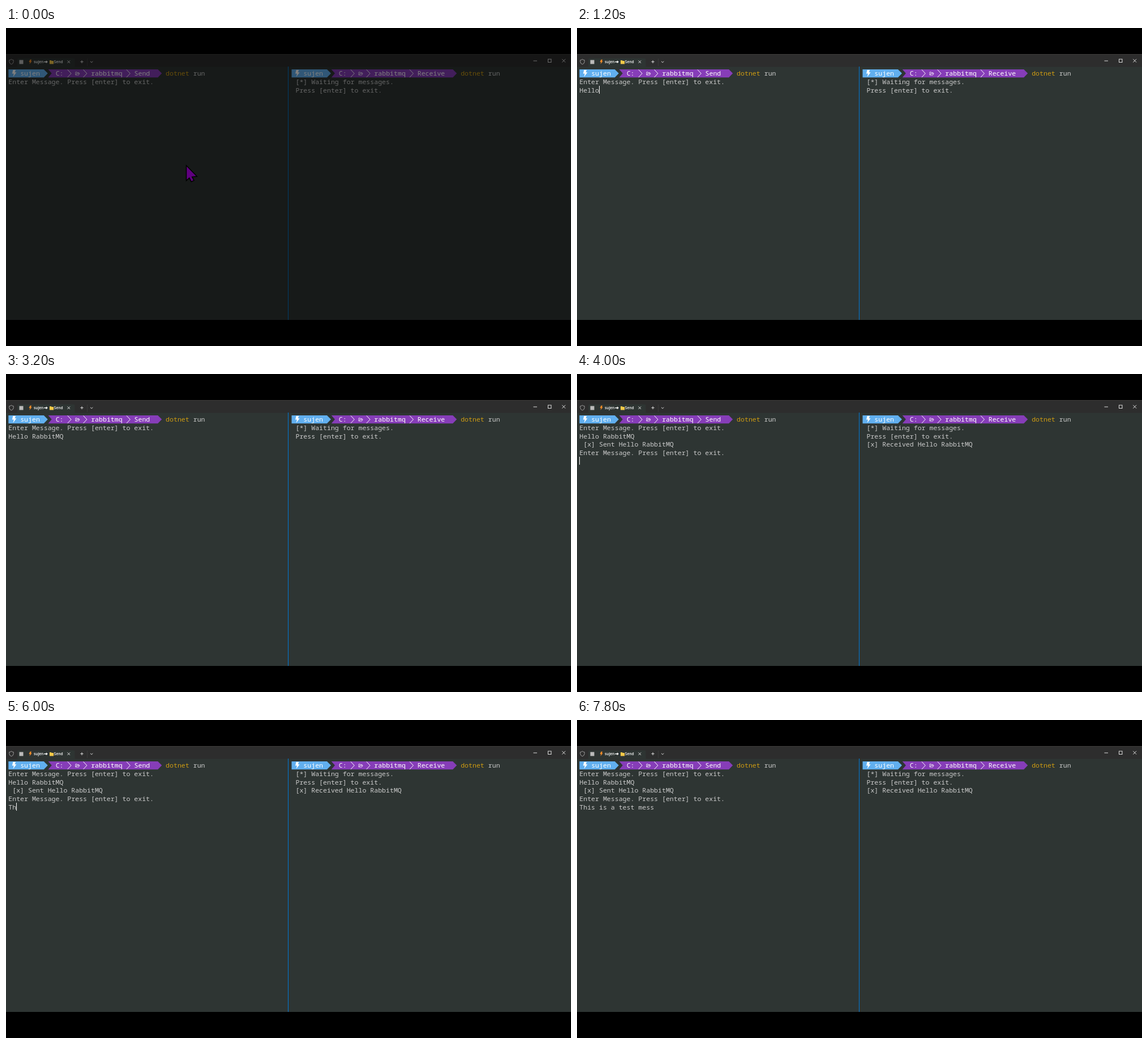
Write an HTML page that moves like this. It is 998x561 px and loops after 8 s.

```html
<!DOCTYPE html>
<html>
<head>
<meta charset="utf-8">
<style>
  html, body { margin: 0; width: 100%; height: 100%; overflow: hidden; background: #000; }
  svg { display: block; }
  text { white-space: pre; fill: #ccc; font: 11.575px "Noto Sans Mono", monospace; font-variant-ligatures: none; }
  .prompt { fill: #fff; font-weight: 500; }
  .cmd { fill: #cf9c12; }
  .tab { fill: #fff; font: 600 6.6px "Open Sans", sans-serif; }
  .line { fill: none; stroke: #ddd; stroke-width: 1; }
</style>
</head>
<body>
<svg id="stage" width="998" height="561" viewBox="0 0 998 561"></svg>
<script>
const CELL = 6.945, ROW = 14.65, USER = 'sujen';
const stage = document.getElementById('stage');
const rowY = row => 84.3 + ROW * row;
const path = (d, attrs) => `<path d="${d}" ${attrs}/>`;
const text = (x, y, str, cls = '') => `<text x="${x}" y="${y}" class="${cls}">${str}</text>`;

// One powerline prompt followed by its command
function prompt(x0, folder) {
  const col = k => x0 + CELL * k;
  const end = 33 + folder.length;
  const chevron = k => path(`M${col(k) + .3} 73.5l6.3 6.7l-6.3 6.7`, 'class="line" style="stroke:#fff"');
  return path(`M${x0} 73H${col(9)}l7 7.1l-7 7.1H${x0}z`, 'fill="#61afef"') +
    path(`M${col(10) + .8} 73H${col(end + 1)}l7 7.1l-7 7.1H${col(10) + .8}l6.2-7.1z`, 'fill="#863db8"') +
    path(`M${col(1) + 1.2} 74h4.6l-1.6 4.2h3l-6 8l1.4-5.6h-3z`, 'fill="#fff"') +
    path(`M${col(17) + .6} 83v-5.2h2.2l.8 1h2.8v1.4M${col(17) + .6} 83l1.8-2.8h5.2l-1.7 2.8z`,
      'class="line" style="stroke:#fff;stroke-width:.8"') +
    [15, 19, 30].map(chevron).join('') +
    [[3, USER], [12, 'C:'], [21, 'rabbitmq'], [32, folder]]
      .map(([k, s]) => text(col(k), rowY(0), s, 'prompt')).join('') +
    text(col(end + 3), rowY(0), 'dotnet', 'cmd') + text(col(end + 10), rowY(0), 'run');
}

const LEFT = 4.3, RIGHT = 504.5, ASK = 'Enter Message. Press [enter] to exit.';

const titleBar =
  `<rect y="46" width="998" height="22.5" fill="#2d2d2d"/><rect y="46" width="998" height="1" fill="#403e3c"/>` +
  path('M18 68.5q2 0 2-2V56q0-2.5 2.5-2.5H119q2.5 0 2.5 2.5V66.500q0 2 2 2z', 'fill="#2e3533"') +
  path('M9.500 55.200q1.800 1.400 3.700 1.400v3q0 3-3.700 4.500q-3.700-1.500-3.700-4.500v-3q1.900 0 3.700-1.400z',
    'class="line" style="stroke:#aaa;stroke-width:.9"') +
  `<rect x="23.500" y="56.500" width="7" height="7" fill="#bbb"/>` +
  path('M42.500 55.800h2.600l-1.300 2.800h2l-4.400 5.200l1-3.900h-1.900z', 'fill="#f28c28"') +
  text(49, 62, USER, 'tab') +
  path('M67.300 59.100h3.500v-1.800l3 2.500l-3 2.500v-1.800h-3.500z', 'fill="#fff"') +
  path('M77 57h2.800l.9 1h3.400v5.500H77z', 'fill="#f7c948"') +
  text(84.800, 62, 'Send', 'tab') +
  path('M108.500 57.400l4.600 4.600m0-4.600l-4.600 4.600M134 57v5.200M131.400 59.600h5.200M149 58.800l2.200 2.100l2.200-2.100M931.500 58h6.500M982.300 54.800l5.800 5.800m0-5.800l-5.800 5.800',
    'class="line"') +
  `<rect x="957.500" y="55" width="5.500" height="5.500" class="line"/>` +
  `<rect x="143" y="54" width="1" height="13" fill="#3a3a3a"/>`;

stage.innerHTML =
  `<rect y="46" width="998" height="469" fill="#2e3533"/>` + titleBar +
  `<rect x="498" y="68" width="1" height="447" fill="#0078d4"/>` +
  prompt(LEFT, 'Send') + prompt(RIGHT, 'Receive') +
  text(LEFT, rowY(1), ASK) +
  [' [*] Waiting for messages.', ' Press [enter] to exit.'].map((s, i) => text(RIGHT, rowY(i + 1), s)).join('') +
  `<text id="first" x="${LEFT}" y="${rowY(2)}"></text><text id="second" x="${LEFT}" y="${rowY(5)}"></text>` +
  `<g id="reply">${text(LEFT, rowY(3), ' [x] Sent Hello RabbitMQ')}${text(LEFT, rowY(4), ASK)}` +
  `${text(RIGHT, rowY(3), ' [x] Received Hello RabbitMQ')}</g>` +
  `<rect id="caret" width="1" height="14" fill="#fff"/>` +
  path('M318.500 242.500V269.300l5.300-4.800l3.400 6.700l4.800-2.300l-3.300-6.300l8.600-.8z',
    'id="mouse" fill="#bf00ff" stroke="#000" stroke-width="1.500"') +
  `<rect id="dim" y="46" width="998" height="469" fill="#000" opacity=".5"/>`;

const $ = id => document.getElementById(id);
const show = (id, on) => $(id).setAttribute('visibility', on ? 'visible' : 'hidden');

// [ms, characters typed, caret visible]
const FIRST = [[0, 0, 0], [600, 1, 1], [800, 2, 1], [1000, 4, 1], [1200, 5, 1], [1400, 6, 1], [1600, 7, 0],
  [1800, 8, 0], [2000, 9, 0], [2200, 10, 0], [2800, 11, 0], [3000, 12, 0], [3200, 14, 0]];
const SECOND = [[4000, 0, 1], [4400, 0, 0], [5000, 0, 1], [6000, 2, 1], [6200, 4, 1], [6400, 6, 1], [6600, 8, 1],
  [6800, 10, 1], [7000, 12, 1], [7200, 14, 1], [7400, 15, 1], [7600, 17, 1], [7800, 19, 0]];
const at = (keys, t) => keys.filter(k => k[0] <= t).pop() || [0, 0, 0];

function draw(now) {
  const t = now % 8000, sent = t >= 4000;
  const first = at(FIRST, t), second = at(SECOND, t);
  const [, typed, caretOn] = sent ? second : first;
  $('first').textContent = 'Hello RabbitMQ'.slice(0, first[1]);
  $('second').textContent = 'This is a test message'.slice(0, second[1]);
  $('caret').setAttribute('x', Math.round(LEFT - .3 + CELL * typed));
  $('caret').setAttribute('y', sent ? 146 : 102);
  show('caret', caretOn);
  show('reply', sent);
  show('mouse', t < 600);
  show('dim', t < 200);
}

const start = performance.now();
function tick() {
  draw(performance.now() - start);
  requestAnimationFrame(tick);
}
tick();
</script>
</body>
</html>
```
